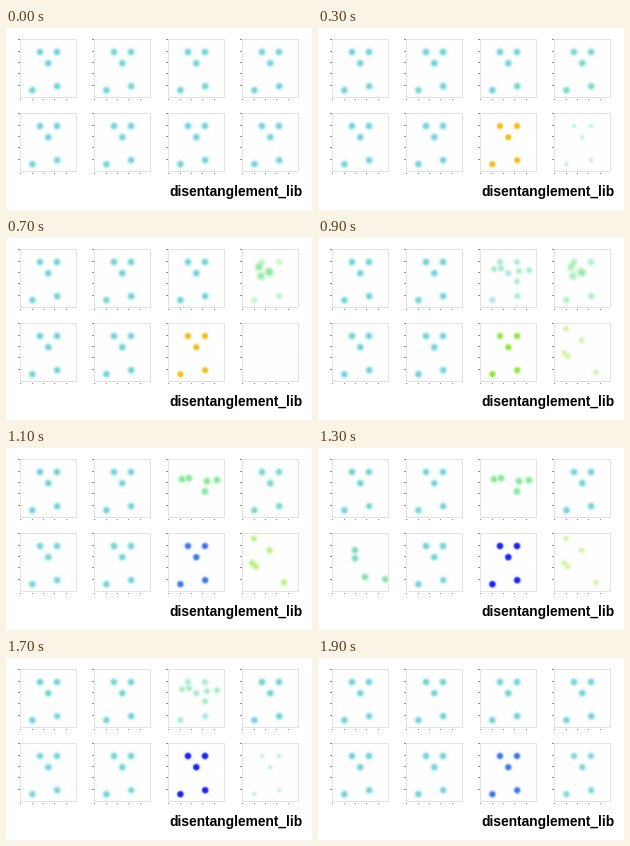
A matplotlib script for the animation above (2 s loop, 306 px wide and 182 px high).

```python
import colorsys
import numpy as np
import matplotlib.pyplot as plt
from matplotlib.animation import FuncAnimation

W, H, DPI = 306, 182, 100
FRAMES, STEP = 20, 100
BOX_W, BOX_H, PITCH = 56, 58, 74
LEFT, TOP = 15, 12
EDGE, TICK = 226, 140

TEAL = np.array([108, 209, 214])
GREEN = np.array([128, 230, 150])
MINT = np.array([122, 221, 178])
LIME = np.array([184, 240, 120])

# dot layouts, relative to a panel's corner
BASE = [(19, 12), (36, 12), (27.3, 23.2), (36.2, 46.2), (11.4, 50.2)]
ARC = [(13, 19.2), (20, 18.2), (38, 21.2), (48, 20.2), (36, 31.4)]
CLUMP = [(16, 17), (26, 21.6), (18, 26)]
TRAIL = [(22, 16.2), (22, 24.3), (32, 43), (52.3, 45.3)]
SCATTER = [(11, 4.6), (26.6, 16.3), (9, 29), (12.8, 32.4), (41, 48.5)]

YY, XX = np.mgrid[0:BOX_H, 0:BOX_W] + 0.5


def mix(a, b, w):
    return a + (b - a) * w


def cycle(k):
    """Triangle wave: 0, up to 1, down to -1, back to 0."""
    return 2 / np.pi * np.arcsin(np.sin(2 * np.pi * k / FRAMES))


def bump(k, mid, flat, fade):
    """1 within `flat` frames of `mid`, easing to 0 over `fade` more."""
    u = np.clip((flat + fade - abs(k - mid)) / fade, 0, 1)
    return u * u * (3 - 2 * u)


def dots(img, points, color, r=3.0, alpha=1.0, soft=0.8):
    for x, y in points:
        d = np.hypot(XX - x, YY - y)
        a = alpha / (1 + np.exp((d - r) / soft))
        img += (color - img) * a[..., None]


def shrinking_dot(img, k):
    s = bump(k, 15, 0, 6)
    dots(img, BASE[:3] + BASE[4:], TEAL)
    dots(img, BASE[3:4], TEAL, 3 - .35 * s)


def tinted_dots(img, k):
    z = cycle(k)
    dots(img, BASE[:4], TEAL, 3 + .15 * z)
    dots(img, BASE[4:], mix(TEAL, MINT, .5 * abs(z)))


def arc_dots(img, k):
    w = bump(k, 13, 2, 4)
    dots(img, BASE, mix(TEAL, MINT, w), 3 - .4 * w, (1 - w) ** .7)
    dots(img, ARC, mix(MINT, GREEN, w), 2.1 + w, w ** .5)


def clump_dots(img, k):
    w = bump(k, 7, .6, 4)
    dots(img, BASE, mix(TEAL, GREEN, w ** .5), 3, 1 - .55 * w)
    dots(img, CLUMP, GREEN, 3.5, .85 * w, 0.9)


def trail_dots(img, k):
    w = bump(k, 14, 1, 2.3)
    dots(img, BASE, TEAL, 3, 1 - w)
    dots(img, TRAIL[:2], mix(MINT, TEAL, .4), 3, w)
    dots(img, TRAIL[2:], mix(MINT, GREEN, .5), 3, w)


def hue_dots(img, k):
    z = cycle(k)
    g = 1 - np.exp(-5 * abs(z))
    hue = .508 + g * (-.4 if z > 0 else .16)
    rgb = colorsys.hsv_to_rgb(hue, .5 + .42 * g, .84 + .12 * g)
    dots(img, BASE, 255 * np.array(rgb), 3 + .5 * max(0, -z) ** 2,
         soft=.8 - .35 * g)


def fading_dots(img, k):
    w = np.exp(-(min(k, FRAMES - k) / 3.3) ** 2)
    dots(img, BASE, mix(MINT, TEAL, w), 1.2 + 1.8 * w, w, .5 + .3 * w)
    v = bump(k, 11, .6, 3.8)
    dots(img, SCATTER, LIME, 1.8 + v, v)


PANELS = [shrinking_dot, tinted_dots, arc_dots, clump_dots,
          trail_dots, shrinking_dot, hue_dots, fading_dots]


def draw_frame(img, x, y):
    right, bottom = x + BOX_W - 1, y + BOX_H - 1
    img[[y - 1, bottom], x - 1:right + 1] = EDGE
    img[y - 1:bottom + 1, [x - 1, right]] = EDGE
    for j in range(5):
        t = round(j * 11.5) - 1
        img[y + t, x - 3:x - 1] = TICK
        img[bottom + 2, x + t] = TICK


def render(k):
    img = np.full((H, W, 3), 255.0)
    for i, paint in enumerate(PANELS):
        x, y = LEFT + PITCH * (i % 4), TOP + PITCH * (i // 4)
        paint(img[y:y + BOX_H, x:x + BOX_W], k)
        draw_frame(img, x, y)
    return np.clip(img, 0, 255).astype(np.uint8)


fig = plt.figure(figsize=(W / DPI, H / DPI), dpi=DPI, facecolor="white")
ax = fig.add_axes([0, 0, 1, 1])
ax.axis("off")
canvas = ax.imshow(render(0), extent=(0, W, H, 0), interpolation="nearest",
                   aspect="auto")
ax.text(296.3, 168, "disentanglement_lib", family="Liberation Sans",
        weight="bold", size=13.7 * 72 / DPI, color="black",
        ha="right", va="baseline")


def update(k):
    canvas.set_data(render(k))
    return [canvas]


anim = FuncAnimation(fig, update, frames=FRAMES, interval=STEP, repeat=True,
                     repeat_delay=0, blit=False)
plt.show()
```
